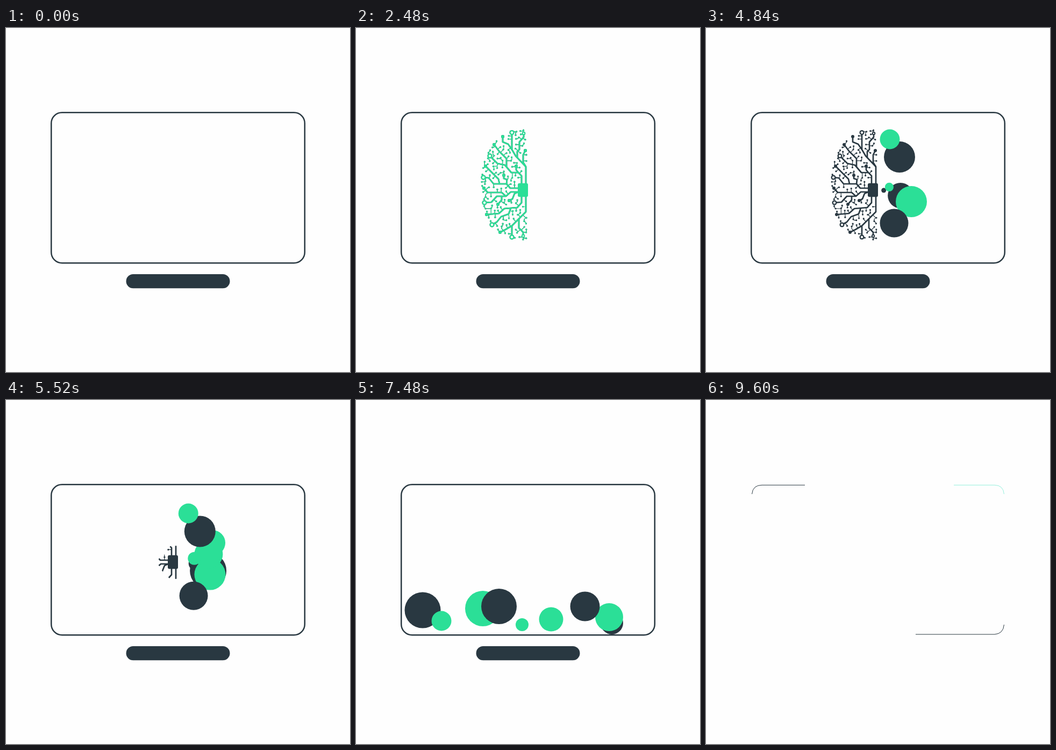
Recreate the animation shown at these times as an HTML page with a canvas. Size 640 px wide and 640 px high, loop 9620 ms.

```html
<!DOCTYPE html>
<html lang="en">
<head>
<meta charset="utf-8">
<style>
  html, body { margin: 0; width: 100%; height: 100%; overflow: hidden; background: #fefefe; }
  canvas { display: block; width: 100vw; height: 100vh; }
</style>
</head>
<body>
<canvas id="stage" width="640" height="640"></canvas>
<script>
const ctx = document.getElementById('stage').getContext('2d');
const LOOP = 9620, DARK = '#293841', GREEN = '#2bdf97', PAPER = '#fefefe';
const FLOOR = 436, REACH = 180;

const progress = (t, from, to) => Math.min(1, Math.max(0, (t - from) / (to - from)));
const easeOut = s => 1 - (1 - s) ** 2;
const easeInOut = s => s * s * (3 - 2 * s);
const mix = (a, b, s) => a + (b - a) * s;

// Trunks of the circuit brain; the letter names the node at the end.
const upperTrunks = [
  'R 316,290 316,258 297,238 290,226 290,194.5',
  'r 300,241 300,230 304,226 304,212 312,203 312,196',
  'd 316,258 311,250 311,236 315,228',
  'd 290,226 283,216 273,212 273,202',
  'R 308,290 308,275 302,269 289,269 277,255 263,252 249,238',
  'd 280,258 280,243 266,229 257,217',
  'd 302,269 298,264 298,257',
  'd 302,298 287,298 280,290 267,290 265,281 241,257',
  'R 267,290 256,290 247,279 237,278',
  'd 280,290 281,282 275,280 275,274'
];
const lowerTrunks = [
  'R 302,305 288,305 279,313 262,313 252,324 239,325',
  'd 279,313 271,306 245,306 238,298',
  'd 271,313 271,320 264,328',
  'd 308,314 308,325 300,334 276,336 266,345 243,347',
  'R 288,335 284,346 270,351 262,361 253,366',
  'R 316,314 316,342 290,368 290,389',
  'd 290,368 278,375 268,380',
  'r 303,355 303,372 311,380 311,387',
  'd 302,305 295,308 291,318 285,321'
];

let seed = 11;
function random() {
  seed = (seed * 16807) % 2147483647;
  return seed / 2147483647;
}

const branches = [], samples = [];

function nearest(x, y) {
  let best = { gap: Infinity };
  for (const p of samples) {
    const gap = Math.hypot(p.x - x, p.y - y);
    if (gap < best.gap) best = { ...p, gap };
  }
  return best;
}

function addBranch(points, width, node, start) {
  let end = start;
  for (let i = 1; i < points.length; i++) {
    const [ax, ay] = points[i - 1], [bx, by] = points[i];
    const length = Math.hypot(bx - ax, by - ay);
    for (let d = 0; d <= length; d += 2) {
      samples.push({ x: mix(ax, bx, d / length), y: mix(ay, by, d / length), dist: end + d });
    }
    end += length;
  }
  const [x, y] = points[points.length - 1];
  samples.push({ x, y, dist: end });
  branches.push({ points, width, node, start, end });
}

for (const line of [...upperTrunks, ...lowerTrunks]) {
  const [node, ...pairs] = line.split(' ');
  const points = pairs.map(pair => pair.split(',').map(Number));
  const root = nearest(...points[0]);
  addBranch(points, 2.7, node, root.gap < 4 ? root.dist : 0);
}

// Twigs fill the free space with short elbows ending in dots.
for (let i = 0; i < 2600; i++) {
  const x = 233 + 84 * random(), y = 189 + 205 * random();
  const outside = ((317 - x) / 83) ** 2.3 + (Math.abs(y - 292) / 102) ** 2.3 > 1;
  if (outside || (x > 295 && Math.abs(y - 302) < 18)) continue;
  const root = nearest(x, y);
  if (root.gap < 5.3 || root.gap > 11) continue;
  const dx = x - root.x, dy = y - root.y;
  const m = Math.min(Math.abs(dx), Math.abs(dy));
  const elbow = [root.x + Math.sign(dx) * m, root.y + Math.sign(dy) * m];
  addBranch([[root.x, root.y], elbow, [x, y]], 1.2, 't', root.dist);
}

function disc(x, y, r, color) {
  ctx.fillStyle = color;
  ctx.beginPath();
  ctx.arc(x, y, Math.max(0, r), 0, 2 * Math.PI);
  ctx.fill();
}

function box(x, y, w, h, r) {
  ctx.beginPath();
  ctx.roundRect(x, y, w, h, r);
}

function drawBrain(reach, color) {
  if (reach <= 0) return;
  ctx.strokeStyle = color;
  ctx.lineJoin = 'round';
  for (const { points, width, start, end } of branches) {
    if (reach <= start) continue;
    ctx.lineWidth = width;
    ctx.setLineDash(reach < end ? [reach - start, 999] : []);
    ctx.beginPath();
    points.forEach(([x, y]) => ctx.lineTo(x, y));
    ctx.stroke();
  }
  ctx.setLineDash([]);
  const radius = { R: 4.5, r: 3.2, d: 3, t: 1.6 };
  for (const { points, node, end } of branches) {
    if (reach < end) continue;
    const [x, y] = points[points.length - 1];
    disc(x, y, radius[node], color);
    if (node === 'R') disc(x, y, 2.2, PAPER);
    if (node === 'r') disc(x, y, 1.2, PAPER);
  }
}

function drawChip(scale, color) {
  ctx.fillStyle = color;
  box(310.5 - 9.5 * scale, 301.5 - 12.7 * scale, 19 * scale, 25.4 * scale, 3 * scale);
  ctx.fill();
}

function drawCable(t) {
  const inside = easeOut(progress(t, 1000, 1340)) - easeInOut(progress(t, 2000, 2400));
  if (inside <= 0) return;
  const x = mix(560, 319, inside);
  ctx.fillStyle = ctx.strokeStyle = GREEN;
  ctx.beginPath();
  ctx.moveTo(x, 295.5);
  ctx.lineTo(x + 26, 295.5);
  ctx.lineTo(x + 39, 300.5);
  ctx.lineTo(x + 39, 303);
  ctx.lineTo(x + 26, 308);
  ctx.lineTo(x, 308);
  ctx.fill();
  ctx.lineWidth = 2.6;
  ctx.beginPath();
  ctx.moveTo(x + 38, 301.8);
  ctx.lineTo(560, 301.8);
  ctx.stroke();
}

// colour, birth time, place beside the brain, then x, y, radius in two later poses
const balls = [
  [DARK, 4615, 380, 316, 227, 369, 34, 124, 391, 33.5],
  [DARK, 4745, 351, 302, 419, 374, 13, 476, 415, 21],
  [GREEN, 4340, 382, 323, 282, 375, 29, 236, 388, 33],
  [DARK, 4200, 350, 363, 313, 405, 26.5, 266, 384, 33],
  [GREEN, 4900, 385, 262, 368, 392, 23.5, 363, 408, 22.5],
  [GREEN, 5000, 375, 285, 449, 344, 26.5, 471, 404, 26],
  [DARK, 4000, 360, 240, 391, 390, 29, 426, 384, 27.5],
  [GREEN, 3720, 342, 207, 234, 336, 18.5, 159, 411, 18.5],
  [GREEN, 4625, 351, 293, 323, 343, 12, 309, 418, 12]
];

function drawBall(t, [color, birth, x0, y0, x1, y1, r1, x2, y2, r2]) {
  if (t < birth) return;
  const pop = easeOut(progress(t, birth, birth + 500));
  if (t < 5500) {
    disc(mix(320, x0, pop), mix(302, y0, pop), r1 * pop, color);
    return;
  }
  const first = progress(t, 5500, 6280), second = progress(t, 6280, 7480);
  const settle = progress(t, 7480, 7720);
  const r = mix(r1, r2, second);
  const height = (y, radius) => Math.max(0, FLOOR - radius - y);
  const h0 = height(y0, r1), h1 = height(y1, r1), h2 = height(y2, r2);
  const h = t < 6280 ? mix(h0, h1, first) * Math.abs(Math.cos(Math.PI * first))
    : t < 7480 ? mix(h1, h2, second) * Math.abs(Math.cos(Math.PI * second))
    : h2 * Math.cos(Math.PI / 2 * settle);
  const x = t < 6280 ? mix(x0, x1, first) : mix(x1, x2, second);
  const growth = 400 * progress(t, 9080, 9340) ** 2;
  disc(x, FLOOR - r - h, r + growth, color);
}

function drawRemnants() {
  const line = (color, ...parts) => {
    ctx.strokeStyle = color;
    ctx.lineWidth = 1;
    ctx.stroke(new Path2D(parts.join('')));
  };
  line(DARK, 'M85.5 175', 'Q87 158.3 104 158.3', 'H184');
  line('#94f0dc', 'M461 158.3', 'H537', 'Q553 158.5 554.5 175');
  line(DARK, 'M390 436', 'H537', 'Q553 435 554.5 418');
}

function draw(t) {
  ctx.fillStyle = PAPER;
  ctx.fillRect(0, 0, 640, 640);
  if (t >= 9600) return drawRemnants();

  ctx.save();
  box(84.2, 157.2, 471.6, 280, 20);
  ctx.clip();
  const presence = progress(t, 0, 200) - progress(t, 5600, 5750);
  if (presence > 0) {
    const grown = REACH * (easeInOut(progress(t, 100, 980)) - easeInOut(progress(t, 5000, 5650)));
    const charged = REACH * (easeOut(progress(t, 1360, 2300)) - progress(t, 2720, 3660));
    drawBrain(grown, DARK);
    drawBrain(charged, GREEN);
    drawChip(presence, charged > 0 ? GREEN : DARK);
  }
  drawCable(t);
  if (t < 9340) balls.forEach(ball => drawBall(t, ball));
  else {
    ctx.fillStyle = DARK;
    ctx.fillRect(84, 157, 472, 281);
    disc(320, 297, 290 * easeOut(progress(t, 9340, 9560)), PAPER);
  }
  ctx.restore();

  ctx.strokeStyle = ctx.fillStyle = DARK;
  ctx.lineWidth = 2.5;
  box(84.2, 157.2, 471.6, 280, 20);
  ctx.stroke();
  ctx.fillStyle = DARK;
  box(223.5, 458, 193, 26.3, 13.1);
  ctx.fill();
}

const began = performance.now();
function tick() {
  const t = (performance.now() - began) % LOOP;
  draw(Math.floor(t / 20) * 20);
  requestAnimationFrame(tick);
}
tick();
</script>
</body>
</html>
```
